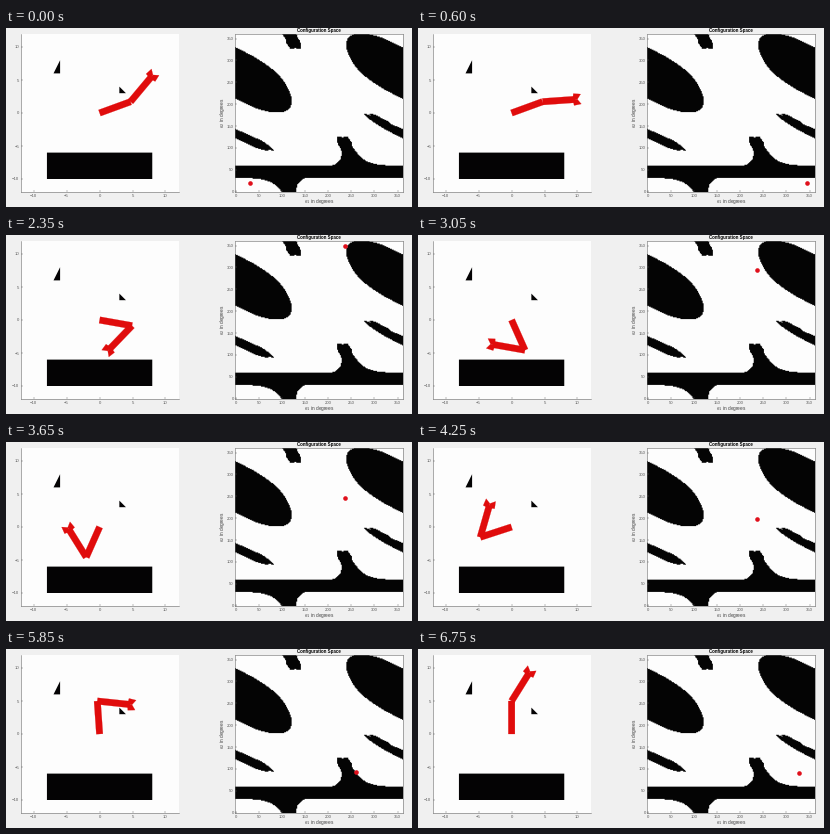
Recreate the animation shown at these times as a matplotlib script. Size 406x179 px, loop 6800 ms.

```python
import numpy as np
import matplotlib.pyplot as plt
from matplotlib.animation import FuncAnimation
from matplotlib.patches import Polygon

W, H, DPI = 406, 179, 64
FRAMES, INTERVAL = 136, 50
STEP, N = 2, 181          # joint angle grid: 0, 2 ... 360 degrees
RED = "#e00c0c"
GREY = "#5a5a5a"
BLACK = "#040304"

plt.rcParams["font.family"] = "Liberation Sans"
plt.rcParams["mathtext.fontset"] = "custom"
plt.rcParams["mathtext.it"] = "Liberation Serif:italic"


def pt(px):
    return px * 72 / DPI


def shape(*xy):
    return np.array([complex(x, y) for x, y in xy])


def box(x0, x1, y0, y1):
    return shape((x0, y0), (x1, y0), (x1, y1), (x0, y1))


OBSTACLES = [
    box(-8, 8, -10, -6),
    shape((-7, 6), (-6, 6), (-6, 8)),
    shape((3, 3), (4, 3), (3, 4)),
]
LINK = box(0, 5, -0.5, 0.5)
PRONG = shape((4.6, 0), (4.75, 0.9), (5.85, 0.75), (5.3, 0))
TOOL = [LINK, PRONG, PRONG.conj()]


def robot(q1, q2):
    """Convex parts of the arm for joint angles in degrees (arrays allowed)."""
    r1 = np.exp(1j * np.radians(q1))[..., None]
    r2 = r1 * np.exp(1j * np.radians(q2))[..., None]
    return [r1 * LINK] + [5 * r1 + r2 * part for part in TOOL]


def overlap(a, b):
    """Separating axis test for convex polygons, vectorised over leading axes."""
    hit = True
    for poly in (a, b):
        normals = 1j * (np.roll(poly, -1, axis=-1) - poly)
        for k in range(poly.shape[-1]):
            n = normals[..., k, None].conj()
            pa, pb = (n * a).real, (n * b).real
            hit = hit & (pa.max(-1) >= pb.min(-1)) & (pb.max(-1) >= pa.min(-1))
    return hit


def config_map():
    q1, q2 = np.mgrid[0:N, 0:N] * float(STEP)
    blocked = np.zeros((N, N), bool)
    for part in robot(q1, q2):
        for obs in OBSTACLES:
            blocked |= overlap(part, obs)
    return blocked


def plan(blocked):
    """Grid walk: left, down through the wrap, then round the neck to the right."""
    x, y = 15, 10
    nodes = [(x, y)]
    for k in range(2 * FRAMES):
        if k < 78:
            x = (x - 1) % N
        elif y > 75 or y < 12 or (y > 45 and not blocked[y - 1, x]):
            y = (y - 1) % N
        else:
            x = min(x + 1, N - 1)
        nodes.append((x, y))
    return np.array(nodes[:2 * FRAMES:2]) * STEP


def add_axes(left, right, top, bottom, xlim, ylim):
    ax = fig.add_axes([left / W, 1 - bottom / H, (right - left) / W, (bottom - top) / H])
    ax.set(xlim=xlim, ylim=ylim, facecolor="#fdfdfd")
    ax.tick_params(direction="in", length=pt(1.6), width=pt(0.4), pad=pt(1.5),
                   labelsize=pt(4.3), color=GREY, labelcolor=GREY)
    for spine in ax.spines.values():
        spine.set(linewidth=pt(0.5), color=GREY)
    return ax


blocked = config_map()
path = plan(blocked)

fig = plt.figure(figsize=(W / DPI, H / DPI), dpi=DPI, facecolor="#f0f0f0")

work = add_axes(14.6, 172.6, 5.8, 164.2, (-12, 12), (-12, 12))
work.set_xticks(range(-10, 11, 5))
work.set_yticks(range(-10, 11, 5))
work.spines[["top", "right"]].set_visible(False)
for obs in OBSTACLES:
    work.add_patch(Polygon(np.c_[obs.real, obs.imag], fc=BLACK, lw=0, snap=False))
arm = [work.add_patch(Polygon([[0, 0]] * 4, fc=RED, ec=RED, lw=pt(0.2), snap=False))
       for _ in range(1 + len(TOOL))]

conf = add_axes(229.3, 396.6, 5.7, 164.2, (-1, 361), (-1, 361))
conf.imshow(np.where(blocked, 4, 253), cmap="gray", vmin=0, vmax=255, origin="lower",
            extent=(-1, 361, -1, 361), aspect="auto", interpolation="bilinear")
conf.set_xticks(range(0, 351, 50))
conf.set_yticks(range(0, 351, 50))
dot, = conf.plot([], [], "o", ms=pt(4.6), color="#e0101c", mew=0, snap=False)

label = dict(fontsize=pt(4.8), color="#404040", ha="center", va="center")
fig.text(313 / W, 1 - 2.8 / H, "Configuration Space", weight="bold",
         **{**label, "fontsize": pt(4.5), "color": "black"})
fig.text(313 / W, 1 - 174 / H, r"$\theta\,_1$ in degrees", **label)
fig.text(217 / W, 1 - 85 / H, r"$\theta\,_2$ in degrees", rotation=90, **label)


def update(i):
    q2, q1 = path[i]
    for patch, part in zip(arm, robot(np.float64(q1), np.float64(q2))):
        patch.set_xy(np.c_[part.real, part.imag])
    dot.set_data([q2], [q1])
    return [*arm, dot]


anim = FuncAnimation(fig, update, frames=FRAMES, interval=INTERVAL,
                     repeat=True, repeat_delay=0, blit=False)
plt.show()
```
